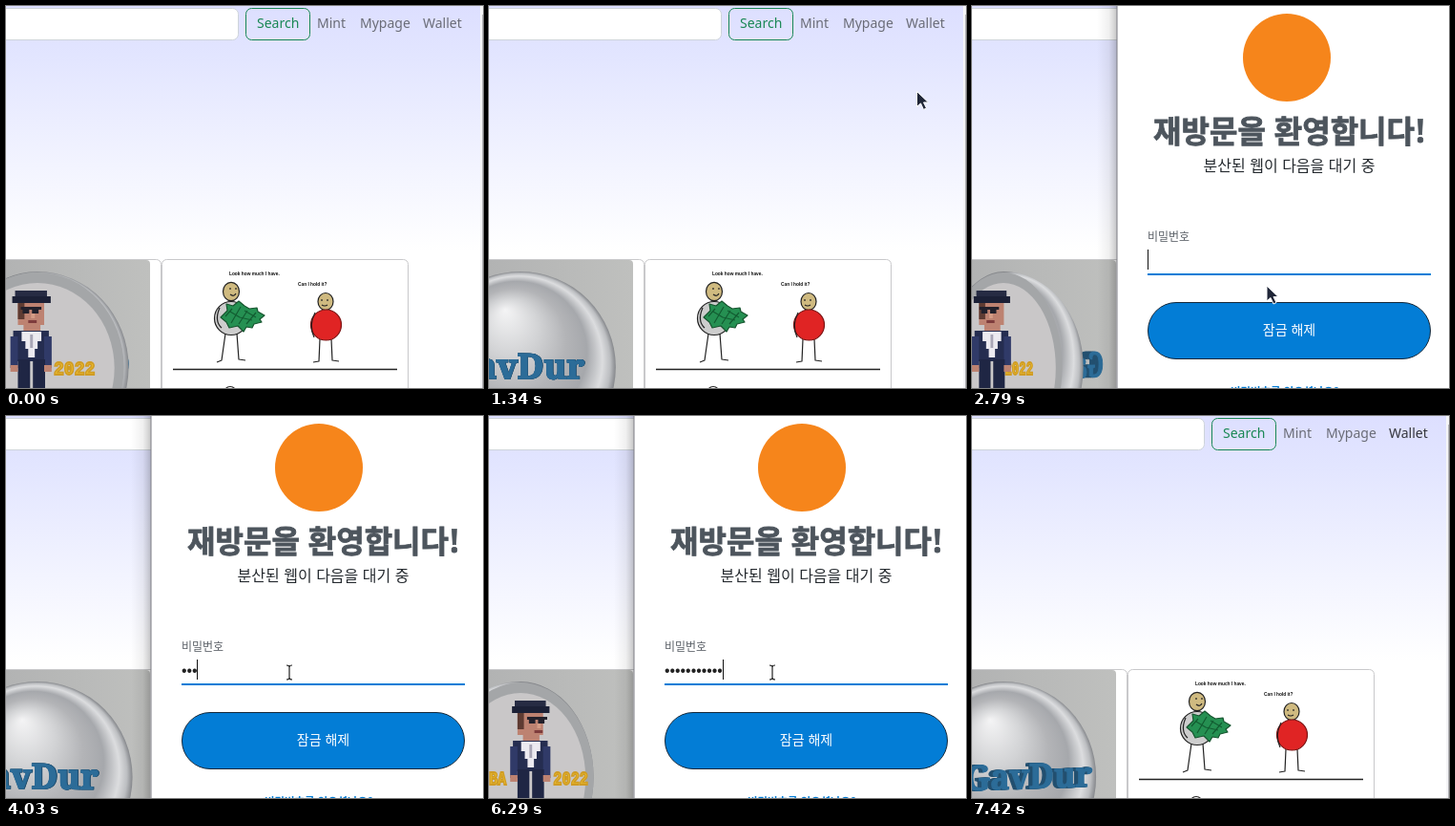
These frames come from a looping animation (500 by 400 pixels, 7490 ms). An HTML page:

```html
<!DOCTYPE html>
<html lang="ko">
<head>
<meta charset="utf-8">
<title>Wallet login</title>
<style>
  html, body { margin: 0; width: 100%; height: 100%; overflow: hidden; background: #fff; }
  svg { display: block; width: 500px; height: 400px; }
  .nav { font: 14px "Noto Sans", "Open Sans", sans-serif; fill: #6a6c77; }
  .ko { font-family: "Noto Sans CJK KR", "Noto Sans CJK", "Noto Sans", sans-serif; }
  .mid { text-anchor: middle; }
  .comic { font: bold 4.8px "Liberation Sans", sans-serif; fill: #111; }
  .line { fill: none; stroke: #222; stroke-width: 1.2; stroke-linejoin: round; }
  .year { font: bold 20px "Liberation Mono", monospace; fill: #eec02f; stroke: #d09c24; stroke-width: 1.8; }
  .word { font: bold 36px "Noto Serif", serif; text-anchor: middle; stroke-width: 1.4; }
</style>
</head>
<body>
<svg viewBox="0 0 500 400">
  <defs>
    <linearGradient id="sky" x2="0" y2="1">
      <stop stop-color="#dddfff"/><stop offset=".2" stop-color="#e2e5ff"/><stop offset="1" stop-color="#fff"/>
    </linearGradient>
    <linearGradient id="wall">
      <stop stop-color="#b2b3b3"/><stop offset="1" stop-color="#bfc0be"/>
    </linearGradient>
    <radialGradient id="silver" fx=".42" fy=".2">
      <stop stop-color="#f4f4f5"/><stop offset=".3" stop-color="#d2d3d5"/>
      <stop offset=".55" stop-color="#b3b4b7"/><stop offset=".74" stop-color="#a6a8ac"/>
      <stop offset=".88" stop-color="#dcdddf"/><stop offset=".95" stop-color="#bcbec1"/>
      <stop offset="1" stop-color="#85878b"/>
    </radialGradient>
    <linearGradient id="shade">
      <stop stop-color="#000" stop-opacity="0"/><stop offset=".6" stop-color="#000" stop-opacity=".06"/>
      <stop offset="1" stop-color="#000" stop-opacity=".22"/>
    </linearGradient>
    <clipPath id="photo"><path d="M0 266H147Q151 266 151 270V400H0Z"/></clipPath>
  </defs>

  <rect width="500" height="400" fill="#fff"/>
  <rect width="497" height="256" fill="url(#sky)"/>
  <rect x="497" width="3" height="400" fill="#f5f5f7"/>
  <rect x="499" y="9" width="1" height="391" fill="#b9b9bd"/>
  <rect x="-20" y="2.5" width="263.5" height="33" rx="6" fill="#fff" stroke="#ced4da"/>
  <rect x="251.5" y="2.5" width="67" height="33" rx="6" fill="none" stroke="#198754"/>
  <g class="nav">
    <text x="263" y="23" style="fill:#198754">Search</text>
    <text x="326" y="23">Mint</text>
    <text x="371" y="23">Mypage</text>
    <text id="wallet" x="437" y="23">Wallet</text>
  </g>

  <rect x="-20" y="265.5" width="182.5" height="160" rx="5" fill="#fff" stroke="#c9c9cb"/>
  <g clip-path="url(#photo)">
    <rect y="266" width="151" height="134" fill="url(#wall)"/>
    <g id="coin">
      <g id="word"></g>
      <path id="dome" fill="url(#silver)"/>
      <g id="face">
        <ellipse id="rim" cx="33" cy="378" ry="99" fill="#a4a6a8"/>
        <ellipse id="plate" cx="33" cy="379" ry="89" fill="#c9c7c8"/>
      </g>
      <g id="front">
        <g id="year">
          <text class="year" x="-60" y="386">BA</text>
          <text class="year" x="28" y="386">2022</text>
        </g>
        <g id="avatar"></g>
      </g>
    </g>
  </g>

  <rect x="163.5" y="265.5" width="258" height="160" rx="5" fill="#fff" stroke="#c9c9cb"/>
  <text class="comic" x="234" y="282">Look how much I have.</text>
  <text class="comic" x="306" y="293">Can I hold it?</text>
  <g class="line">
    <path d="M236 308V312M230 343L226 371 221 373M242 343L244 370 251 371"/>
    <ellipse cx="236" cy="299" rx="8.5" ry="9.7" fill="#cfba80"/>
    <path d="M235 295v2M241 295v2M235 302q4 3 6-1"/>
    <circle cx="236" cy="327" r="17.5" fill="#cdcdcd"/>
    <path d="M224 316Q218 330 226 337"/>
    <path d="M225 326L232 319 231 312 238 314 244 309 250 314 255 317 263 316 264 320 271 324 266 328 268 331 260 333 258 337 252 336 249 341 243 335 234 337 231 331Z" fill="#259052" stroke="#17552f"/>
    <path d="M230 325l7-8M236 332l10-17M244 333l9-14M252 333l10-12M235 320l10 6M245 326l13 3M250 319l12 7" stroke="#125c31"/>
    <path d="M335 318V322M329 349L328 372 322 373M341 349L342 371 349 372"/>
    <ellipse cx="335" cy="309.5" rx="8" ry="9" fill="#cfba80"/>
    <path d="M331 307v2M337 307v2M331 313q3 2 6 0"/>
    <circle cx="335.5" cy="334" r="16" fill="#e02424" stroke="#7c1515"/>
    <path d="M324 321Q317 334 323 347"/>
    <path d="M175 380.5H410" stroke-width="1.5"/>
    <circle cx="235" cy="405" r="6.5"/>
  </g>

  <g id="popup">
    <rect x="131" width="21" height="400" fill="url(#shade)"/>
    <rect x="152" width="348" height="400" fill="#fff"/>
    <path d="M152 0V400" stroke="#7d7d84"/>
    <g id="form" class="ko">
      <circle id="badge" cy="54" r="46" fill="#f6851b"/>
      <text class="mid" x="333" y="142.5" font-size="32" font-weight="700" fill="#4d555d" stroke="#4d555d" stroke-width=".8">재방문을 환영합니다!</text>
      <text class="mid" x="332.5" y="172.5" font-size="16" fill="#24292e">분산된 웹이 다음을 대기 중</text>
      <text x="184" y="245.5" font-size="12" fill="#5b6067">비밀번호</text>
      <text id="dots" x="184" y="272" font-size="15.8" fill="#222" style="font-family:'Liberation Sans',sans-serif"></text>
      <path id="caret" d="M.5 255V276" stroke="#111"/>
      <rect x="184" y="280" width="297" height="2" fill="#037dd6"/>
      <rect x="184.5" y="310.5" width="296" height="59" rx="29.5" fill="#037dd6" stroke="#14283a"/>
      <text class="mid" x="332.5" y="344" font-size="14" fill="#fff">잠금 해제</text>
      <text class="mid" x="328" y="408" font-size="11.4" font-weight="700" fill="#037dd6">비밀번호를 잊으셨나요?</text>
    </g>
  </g>

  <g id="pointer">
    <circle id="glow" r="11" cy="2" fill="#f2e32f" opacity=".75"/>
    <path id="arrow" d="M0 0V16L4 12.5 7 19 10 17.5 7 11.5H12Z" fill="#202638" stroke="#fff"/>
    <path id="hand" d="M0 1q2-2 4 0V7q2-1 3 1 2-1 3 1 2-1 2 2V14L10 18H3L-3 11q0-3 3-1Z" fill="#fff" stroke="#222"/>
    <path id="beam" d="M-3 -7Q0 -7 0 -5Q0 -7 3 -7M0 -5V7M-3 8Q0 8 0 6Q0 8 3 8" fill="none" stroke="#222" stroke-width="1.2"/>
  </g>
</svg>

<script>
const LOOP = 7490, CX = 33, CY = 378, RADIUS = 100, DEPTH = 72;
const $ = id => document.getElementById(id);
const show = (id, on) => { $(id).style.display = on ? "" : "none"; };
const spread = (from, to, n) => Array.from({ length: n }, (_, i) => from + (to - from) * i / (n - 1));

// The picture is held between these times.
const steps = [0, ...spread(70, 750, 9), ...spread(850, 1560, 7), ...spread(1670, 2020, 4),
  2270, 2520, 2790, 3040, 3290, 3530, 3780, 4030, 4280, 4530, 4780, 5030, 5280, 5530,
  5790, 6040, 6290, 6540, 6800, ...spread(7050, 7420, 5)];

// [time, value...]
const turn = [[0, 25], [750, 460], [1340, 545], [2790, 1132], [4030, 1625], [6290, 2480], [7420, 3040]];
const path = [[70, 415, 400], [400, 446, 150], [660, 463, 17], [850, 463, 17], [1340, 448, 92],
  [1560, 415, 145], [2020, 350, 232], [2520, 309, 293], [2790, 309, 293], [3290, 298, 267], [3530, 297, 268]];
const typed = [[0, 0], [3530, 1], [3780, 3], [4280, 4], [4530, 5], [4780, 8], [5030, 9], [5280, 11]];

function tween(keys, t) {
  const i = keys.findIndex(k => k[0] > t);
  if (i < 0) return keys.at(-1).slice(1);
  if (i === 0) return keys[0].slice(1);
  const [a, b] = [keys[i - 1], keys[i]], p = (t - a[0]) / (b[0] - a[0]);
  return a.slice(1).map((v, j) => v + (b[j + 1] - v) * p);
}

const block = (x, y, w, h, fill) => `<rect x="${x}" y="${y}" width="${w}" height="${h}" fill="${fill}"/>`;
const NAVY = "#252d50", SKIN = "#bd8271", DARK = "#22202b", SHIRT = "#eceaf0";
$("avatar").innerHTML =
  block(-19, 340, 38, 32, NAVY) + block(-22, 346, 8, 33, "#303a68") + block(14, 346, 8, 33, "#303a68") +
  block(-10, 341, 21, 10, SHIRT) + block(-6, 351, 13, 8, SHIRT) + block(-3, 359, 7, 9, SHIRT) +
  block(-1, 344, 3, 14, "#a9a6b6") +
  block(-14, 370, 13, 32, "#1f2644") + block(2, 370, 13, 32, "#1f2644") +
  block(-22, 376, 8, 7, SKIN) + block(14, 376, 8, 7, SKIN) +
  block(-14, 310, 28, 24, SKIN) + block(-8, 334, 18, 6, SKIN) + block(-14, 310, 7, 18, "#5e3b32") +
  `<g id="features">${block(-8, 315, 22, 3, DARK) + block(-6, 318, 7, 4, DARK) +
    block(4, 318, 7, 4, DARK) + block(0, 329, 9, 3, "#7e3c3c") + block(3, 322, 4, 5, "#d49c86")}</g>` +
  block(-17, 298, 34, 8, "#262b43") + block(-20, 304, 41, 7, "#1b2036");

// Stacked copies give the lettering its thickness.
$("word").innerHTML = [66, 69, 72, 75, 78].map(d => {
  const fill = d === 78 ? "#2c6c98" : "#235070";
  return `<text class="word" data-d="${d}" y="12" fill="${fill}" stroke="${fill}">GavDur</text>`;
}).join("");

function drawCoin(degrees) {
  const a = degrees * Math.PI / 180, c = Math.cos(a), s = Math.sin(a);
  const flat = RADIUS * Math.abs(c), bulge = Math.hypot(RADIUS * c, DEPTH * s);
  const [left, right] = s > 0 ? [flat, bulge] : [bulge, flat];
  const top = CY - RADIUS, bottom = CY + RADIUS;
  $("dome").setAttribute("d",
    `M${CX} ${top}A${right} ${RADIUS} 0 0 1 ${CX} ${bottom}A${left} ${RADIUS} 0 0 1 ${CX} ${top}Z`);
  $("rim").setAttribute("rx", flat);
  $("plate").setAttribute("rx", flat * .89);
  show("face", c > 0);

  $("year").setAttribute("transform", `translate(${CX - 20 * s}) scale(${c} 1)`);
  $("avatar").setAttribute("transform", `translate(${CX - 16 * s}) scale(${.82 + .18 * Math.abs(c)} 1)`);
  $("features").setAttribute("transform", `translate(${-7 * s})`);
  for (const copy of $("word").children) {
    const x = CX + copy.dataset.d * s;
    copy.setAttribute("transform", `translate(${x} ${CY}) skewY(${-6 * s * Math.abs(c)}) scale(${-c} 1)`);
  }
  const order = ["word", "dome", "face", "front"];
  if (c < 0) order.reverse();
  $("coin").append(...order.map($));
}

function draw(t) {
  drawCoin(tween(turn, t)[0]);
  $("wallet").style.fill = t >= 7050 ? "#34353c" : "";

  show("popup", t >= 1670 && t < 7050);
  show("form", t >= 1780);
  const count = typed.findLast(k => k[0] <= t)[1];
  $("dots").textContent = "•".repeat(count);
  $("caret").setAttribute("transform", `translate(${184 + Math.floor(count * 5.55)})`);
  $("badge").setAttribute("cx", t < 3290 ? 330 : 328);

  const [x, y] = tween(path, t);
  const clicking = t > 600 && t < 900, typing = t >= 3530;
  show("pointer", t >= 70 && t < 6540);
  $("pointer").setAttribute("transform", `translate(${x} ${y})`);
  show("glow", clicking);
  show("hand", clicking);
  show("arrow", !clicking && !typing);
  show("beam", typing);
}

const start = performance.now();
let last = -1;
function frame() {
  const now = (performance.now() - start) % LOOP;
  const t = steps.findLast(v => v <= now + .5);
  if (t !== last) draw(last = t);
  requestAnimationFrame(frame);
}
frame();
</script>
</body>
</html>
```
